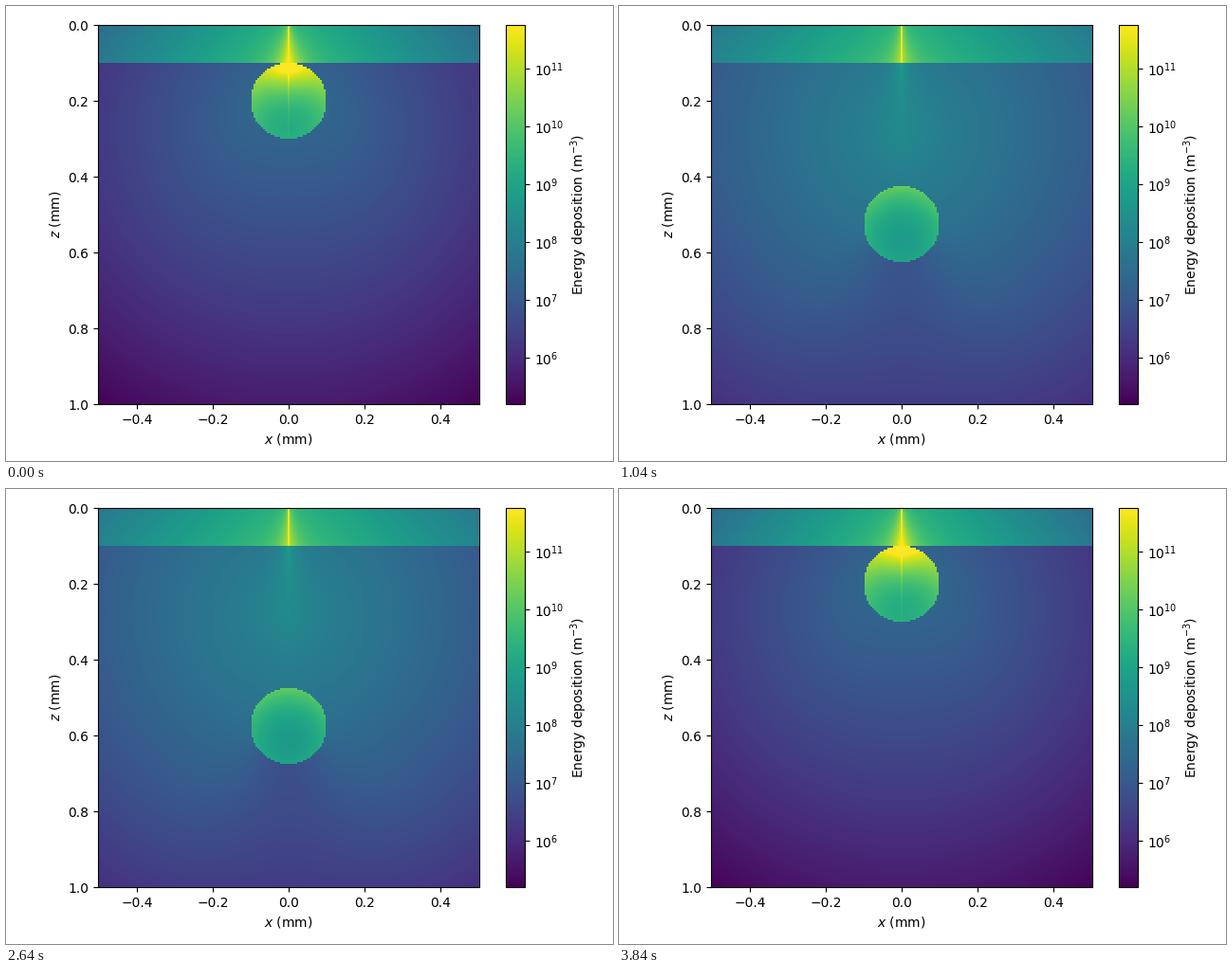
A matplotlib script for the animation above (3.92 s loop, 640 by 480 pixels).

```python
import numpy as np
import matplotlib.pyplot as plt
from matplotlib.animation import FuncAnimation
from matplotlib.colors import LogNorm

W, H = 640, 480
FRAMES, INTERVAL = 49, 80
LOG_MIN, LOG_MAX = 5.197, 11.754
LAYER, RADIUS = 0.1, 0.1

# Cell centres of the 201 x 200 grid, in mm
x, z = np.meshgrid(np.arange(-100, 101) * 0.005,
                   (np.arange(200) + 0.5) * 0.005)
ax_dist = np.abs(x)
on_axis = ax_dist < 1e-6


def layer_level(near):
    """Absorbing top layer with the narrow beam through it."""
    depth = z / LAYER
    level = 0.68 - 0.5 * ax_dist + 0.05 * (depth - 0.5)
    level += (0.17 + 0.04 * depth) * np.exp(-ax_dist / (0.008 + 0.018 * depth))
    level += near * (0.13 * depth * np.exp(-ax_dist / 0.035) - 0.1 * ax_dist)
    return np.where(on_axis, 0.985, level)


def medium_level(zc, near):
    """Scattering medium: diffuse glow, beam cone and the sphere's shadow."""
    r = np.hypot(x, z - 0.28)
    level = 0.45 - 0.25 * r - 0.12 * r**2 - 0.13 * near
    level += 0.07 * near * np.exp(-np.hypot(x, z - 0.2) / 0.2)

    below = np.maximum(z - LAYER, 0)
    cone = 0.15 * np.exp(-below / 0.12 - ax_dist / (0.02 + 0.2 * below))
    level += np.where(z < zc, cone, 0)

    gap = np.maximum(z - zc, 0)
    width = 0.06 + 0.45 * gap
    shadow = 0.12 * np.exp(-gap / 0.32 - (x / width)**2)
    shadow *= np.clip(gap / 0.08, 0, 1) * (1 - 0.6 * near)
    return level - shadow


def sphere_level(zc, near):
    """Absorbing sphere: bright cap and rim, darker low interior."""
    v = (z - zc) / RADIUS
    u2 = (x / RADIUS)**2 + v**2
    core = 0.54 + 0.11 * np.exp(-max(zc - 0.325, 0) / 0.15) - 0.04 * near
    level = core - (0.09 + 0.02 * near) * v + 0.11 * u2
    entry = np.hypot(x, z - LAYER)
    level += 0.35 * near**2 * np.exp(-entry / 0.07)
    ray = 0.12 * near**2 * np.exp(-np.maximum(z - LAYER, 0) / 0.1)
    return level + np.where(on_axis, ray, 0)


def deposition(i):
    zc = 0.2 + 0.025 * min(i, FRAMES - 1 - i)
    near = np.exp(-(zc - 0.2) / 0.08)
    level = np.where(z < LAYER, layer_level(near), medium_level(zc, near))
    inside = np.hypot(x, z - zc) < RADIUS - 1e-6
    level = np.where(inside, sphere_level(zc, near), level)
    return 10 ** (LOG_MIN + (LOG_MAX - LOG_MIN) * np.clip(level, 0.005, 0.998))


def pixel_axes(left, top, width, height):
    return fig.add_axes([left / W, 1 - (top + height) / H, width / W, height / H])


fig = plt.figure(figsize=(W / 100, H / 100), dpi=100)
ax = pixel_axes(97, 20, 402, 400)
cax = pixel_axes(527, 20, 20, 400)

image = ax.imshow(deposition(0), cmap="viridis", interpolation="nearest",
                  norm=LogNorm(10**LOG_MIN, 10**LOG_MAX), aspect="auto",
                  extent=(-0.5025, 0.5025, 1, 0))
ax.set_xticks([-0.4, -0.2, 0, 0.2, 0.4])
ax.set_yticks(np.arange(6) * 0.2)
ax.set_xlabel("$x$ (mm)")
ax.set_ylabel("$z$ (mm)")

bar = fig.colorbar(image, cax=cax, label="Energy deposition (m$^{-3}$)")
bar.set_ticks([10.0**k for k in range(6, 12)])
bar.minorticks_off()


def update(i):
    image.set_data(deposition(i))
    return [image]


anim = FuncAnimation(fig, update, frames=FRAMES, interval=INTERVAL,
                     repeat=True, repeat_delay=0)
plt.show()
```
